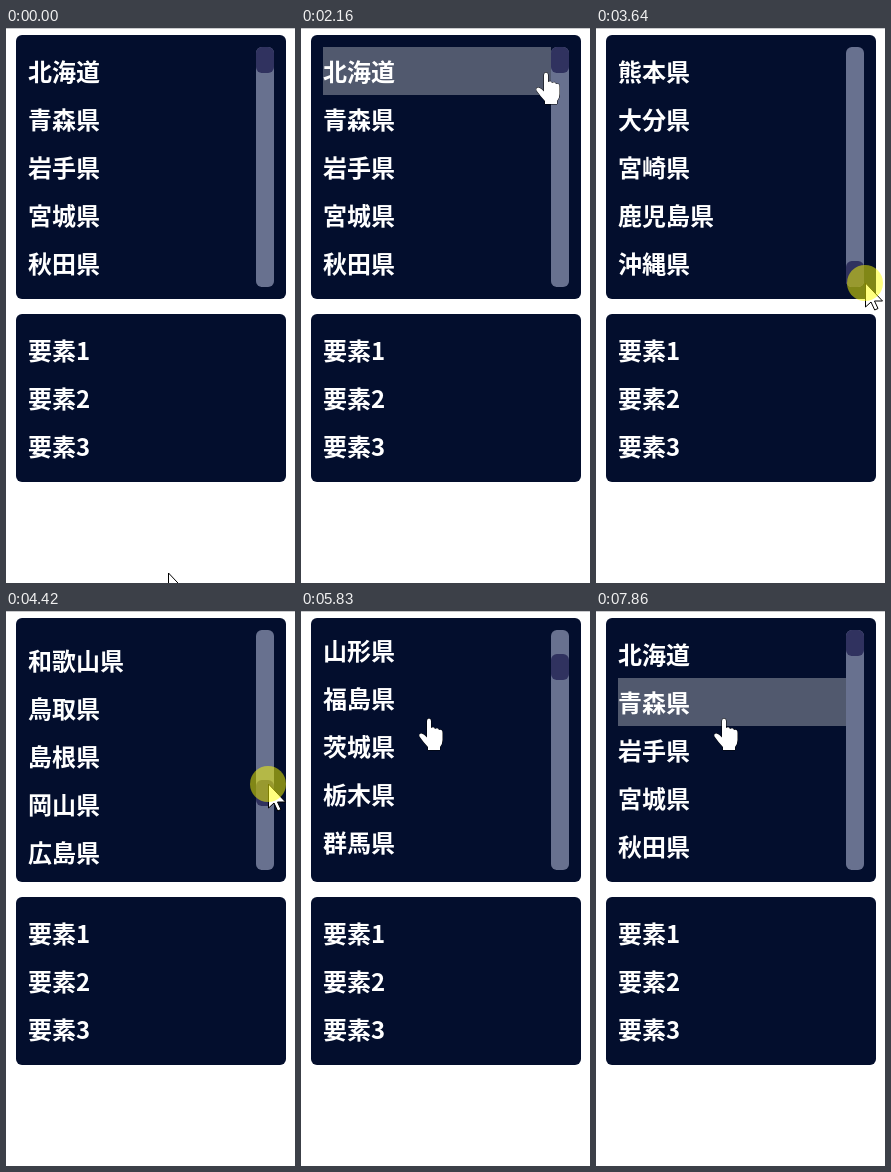
An HTML page that plays this animation: 289 by 555 pixels, repeating every 8 s.

```html
<!DOCTYPE html>
<html lang="ja">
<head>
<meta charset="utf-8">
<style>
  html, body { margin: 0; width: 100%; height: 100%; overflow: hidden; background: #fff; }
  body { position: relative; font: 700 24px/48px "Noto Sans CJK JP", "Noto Sans CJK", sans-serif; color: #fff; }
  body > *, .track, .thumb { position: absolute; }
  .rule { left: 0; top: 0; width: 100%; height: 1px; background: #c9cacd; }
  .panel { left: 10px; width: 246px; padding: 12px; border-radius: 6px; background: #030e2d; }
  #prefectures { top: 7px; height: 240px; }
  #elements { top: 286px; height: 144px; }
  .view { height: 100%; overflow: hidden; }
  #prefectures .view { width: 228px; }
  .row { height: 48px; white-space: nowrap; }
  .row.hover { background: rgba(255, 255, 255, .31); }
  .track { left: 240px; top: 12px; width: 18px; height: 240px; border-radius: 6px; background: #68718f; }
  .thumb { left: 0; top: 0; width: 18px; height: 25.5px; border-radius: 6px; background: #30325f; }
  svg { left: 0; top: 0; width: 100%; height: 100%; }
</style>
</head>
<body>
<div class="rule"></div>
<div class="panel" id="prefectures">
  <div class="view"><div class="list"></div></div>
  <div class="track"><div class="thumb"></div></div>
</div>
<div class="panel" id="elements"><div class="view"><div class="list"></div></div></div>
<svg>
  <g id="cursor" fill="#fff" stroke="#000" stroke-linejoin="round">
    <path id="arrow" d="M.5 0V24L6 19L9.700 27L13 25.500L9.500 18H17.500Z"/>
    <path id="hand" paint-order="stroke" d="M0 2Q0-.5 2-.5T4 2V9Q7 7 8 10Q11 8 12 11Q15.500 10 15.500 14V21Q15.500 25 13 28V31H1V28Q-3 24-7.500 17.500Q-8.500 14.500-5.500 14.500Q-3 15 0 18.500Z"/>
    <circle id="press" r="18" fill="#ff0" fill-opacity=".5" stroke="none"/>
  </g>
</svg>
<script>
const ROW = 48, VIEW = 240, DURATION = 8000, PRESS_Y = 28, LAG = 8;
const prefectures = ('北海道 青森県 岩手県 宮城県 秋田県 山形県 福島県 茨城県 栃木県 群馬県 埼玉県 千葉県 ' +
  '東京都 神奈川県 新潟県 富山県 石川県 福井県 山梨県 長野県 岐阜県 静岡県 愛知県 三重県 滋賀県 京都府 ' +
  '大阪府 兵庫県 奈良県 和歌山県 鳥取県 島根県 岡山県 広島県 山口県 徳島県 香川県 愛媛県 高知県 福岡県 ' +
  '佐賀県 長崎県 熊本県 大分県 宮崎県 鹿児島県 沖縄県').split(' ');
const MAX_SCROLL = prefectures.length * ROW - VIEW;
const TRAVEL = VIEW - VIEW * VIEW / (prefectures.length * ROW);

// Keys are [time, value...]
const pointerKeys = [
  [0, 162, 545], [350, 172, 370], [690, 185, 207], [870, 185, 207], [1050, 178, 114],
  [1650, 178, 114], [2000, 222, 62], [2330, 266, PRESS_Y], [2690, 266, PRESS_Y],
  [2950, 269, 84], [3480, 271, 230], [3560, 270, 244], [3640, 269, 255], [3880, 269, 268],
  [4060, 269, 268], [4880, 252, 53], [4960, 254, 36], [5080, 253, 18], [5200, 253, 18],
  [5580, 126, 108]
];
const wheelKeys = [[5700, 0], [6600, 1676], [6850, MAX_SCROLL], [7420, MAX_SCROLL], [7820, 0]];
const pressTime = [2410, 5200];
const wheelTimes = [[5700, 6880], [7420, 7840]];

const $ = selector => document.querySelector(selector);
const within = (v, [from, to]) => v >= from && v < to;

function sample(keys, t) {
  const next = keys.findIndex(key => key[0] > t);
  if (next < 0) return keys.at(-1).slice(1);
  if (next === 0) return keys[0].slice(1);
  const a = keys[next - 1], b = keys[next];
  const k = (t - a[0]) / (b[0] - a[0]);
  return a.slice(1).map((v, i) => v + (b[i + 1] - v) * k);
}

function scrollAt(t) {
  if (!within(t, pressTime)) return sample(wheelKeys, t)[0];
  const y = sample(pointerKeys, t - LAG)[1];
  return Math.max(0, Math.min(MAX_SCROLL, (y - PRESS_Y) / TRAVEL * MAX_SCROLL));
}

function fillList(selector, names) {
  const list = $(selector + ' .list');
  list.innerHTML = names.map(name => `<div class="row">${name}</div>`).join('');
  return list;
}

const prefectureList = fillList('#prefectures', prefectures);
const elementList = fillList('#elements', ['要素1', '要素2', '要素3']);

function setHover(list, index) {
  [...list.children].forEach((row, i) => row.classList.toggle('hover', i === index));
}

function draw(t) {
  const [x, y] = sample(pointerKeys, t);
  const scroll = scrollAt(t);
  const overFirst = within(x, [22, 250]) && within(y, [19, 259]);
  const overSecond = within(x, [22, 268]) && within(y, [298, 442]);

  // The hovered row stays the same while the wheel turns
  const wheel = wheelTimes.find(span => within(t, span));
  const hoverScroll = wheel ? scrollAt(wheel[0]) : scroll;
  setHover(prefectureList, overFirst ? Math.floor((y - 19 + hoverScroll) / ROW) : -1);
  setHover(elementList, overSecond ? Math.floor((y - 298) / ROW) : -1);

  prefectureList.style.transform = `translateY(${-Math.round(scroll)}px)`;
  const thumbY = Math.round(scrollAt(t - LAG) / MAX_SCROLL * TRAVEL);
  $('.thumb').style.transform = `translateY(${thumbY}px)`;

  const show = (id, visible) => $(id).style.display = visible ? '' : 'none';
  show('#press', within(t, pressTime));
  show('#hand', overFirst || overSecond);
  show('#arrow', !overFirst && !overSecond);
  $('#cursor').setAttribute('transform', `translate(${Math.round(x)} ${Math.round(y)})`);
}

function tick() {
  draw(performance.now() % DURATION);
  requestAnimationFrame(tick);
}
tick();
</script>
</body>
</html>
```
